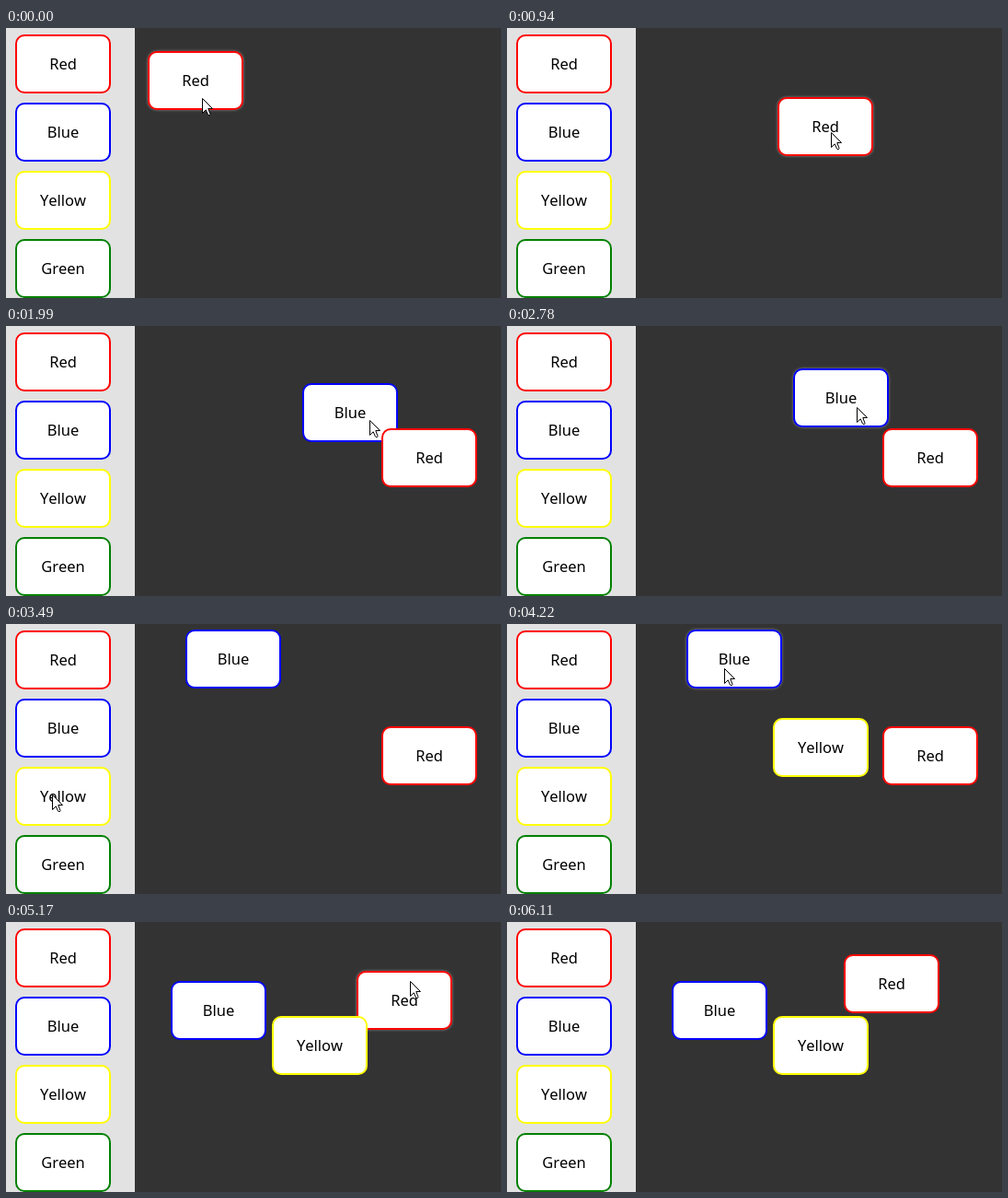
Recreate the animation shown at these times as an HTML page. Size 538x293 px, loop 6790 ms.

```html
<!DOCTYPE html>
<html lang="en">
<head>
<meta charset="utf-8">
<title>Drag the cards</title>
<style>
  html, body { margin: 0; width: 100%; height: 100%; overflow: hidden; background: #333; }
  #side { position: absolute; left: 0; top: 0; width: 140px; height: 100%; background: #e2e2e2; }
  .card {
    position: absolute; left: 0; top: 0; width: 104px; height: 64px; box-sizing: border-box;
    border: 2px solid var(--c); border-radius: 10px; background: #fff; color: #000;
    font: 16.5px/60px "Noto Sans", "Open Sans", sans-serif; font-kerning: none; text-align: center;
  }
  .helper { z-index: 1; }
  .dropped { z-index: 2; }
  .hover { box-shadow: 0 0 3px #888; }
  #cursor { position: absolute; left: 0; top: 0; z-index: 3; overflow: visible; }
</style>
</head>
<body>
<div id="side"></div>
<svg id="cursor" width="12" height="19">
  <path d="M.5 .5V16.5L4.2 12.8L6.5 18L7 18.5H8.5L9 17.5L6.8 11.5H11.5Z" fill="#fff" stroke="#000"/>
</svg>
<script>
const LOOP = 6790, TICK = 135.5, LEAD = 66;
const names = ['Red', 'Blue', 'Yellow', 'Green'];
const cursor = document.getElementById('cursor');

// Pointer stops: tick of arrival, x, y and the card dragged on the way.
const stops = [
  [0, 213, 76], [1, 213, 70], [5, 353, 120, 'Red'], [7, 352, 113], [9, 466, 149, 'Red'],
  [13, 83, 121], [14, 86, 121, 'Blue'], [15, 395, 102, 'Blue'], [16, 404, 102, 'Blue'],
  [20, 390, 94], [21, 380, 88, 'Blue'], [22, 264, 48, 'Blue'], [24, 74, 117],
  [26, 50, 185], [27, 148, 174, 'Yellow'], [28, 339, 142, 'Yellow'], [29, 339, 142],
  [31, 236, 48], [32, 236, 48], [34, 220, 106, 'Blue'], [36, 436, 136], [37, 466, 122],
  [38, 439, 64, 'Red'], [40, 424, 46, 'Red'], [42, 503, 237], [45, 514, 300]
];

const easeOut = u => 1 - (1 - u) ** 3;
const sideY = name => 7 + 74 * names.indexOf(name);

function addCard(name) {
  const el = document.createElement('div');
  el.className = 'card';
  el.style.setProperty('--c', name);
  el.textContent = name;
  document.body.insertBefore(el, cursor);
  return el;
}

function place(el, x, y) {
  el.style.transform = `translate(${Math.round(x)}px, ${Math.round(y)}px)`;
}

names.forEach(name => place(addCard(name), 10, sideY(name)));
const copies = names.slice(0, 3).map(name => ({ name, el: addCard(name) }));

// Follows the pointer up to a tick. A card pulled from the side bar is a
// helper until it is let go; then it drops 10px up and to the left.
function poseAt(tick) {
  const cards = { Red: { x: 154, y: 25, dropped: true } };
  let [, px, py] = stops[0];
  for (let i = 1; i < stops.length && stops[i - 1][0] < tick; i++) {
    const start = stops[i - 1][0], [end, x, y, name] = stops[i];
    const k = easeOut(Math.min(1, (tick - start) / (end - start)));
    const dx = (x - px) * k, dy = (y - py) * k;
    px += dx;
    py += dy;
    if (name) {
      const card = cards[name] ??= { x: 10, y: sideY(name), dropped: false };
      card.x += dx;
      card.y += dy;
    } else {
      for (const card of Object.values(cards)) {
        if (card.dropped) continue;
        card.dropped = true;
        card.x -= 10;
        card.y -= 10;
      }
    }
  }
  return { px, py, cards };
}

function draw() {
  const t = performance.now() % LOOP;
  const { px, py, cards } = poseAt(Math.floor((t + LEAD) / TICK));
  place(cursor, px, py);

  let top = null;
  for (const { name, el } of copies) {
    const card = cards[name];
    el.hidden = !card;
    if (!card) continue;
    const { x, y, dropped } = card;
    place(el, x, y);
    el.className = 'card ' + (dropped ? 'dropped' : 'helper');
    if (dropped && px >= x && px < x + 104 && py >= y && py < y + 64) top = el;
  }
  if (top) top.classList.add('hover');

  requestAnimationFrame(draw);
}
draw();
</script>
</body>
</html>
```
